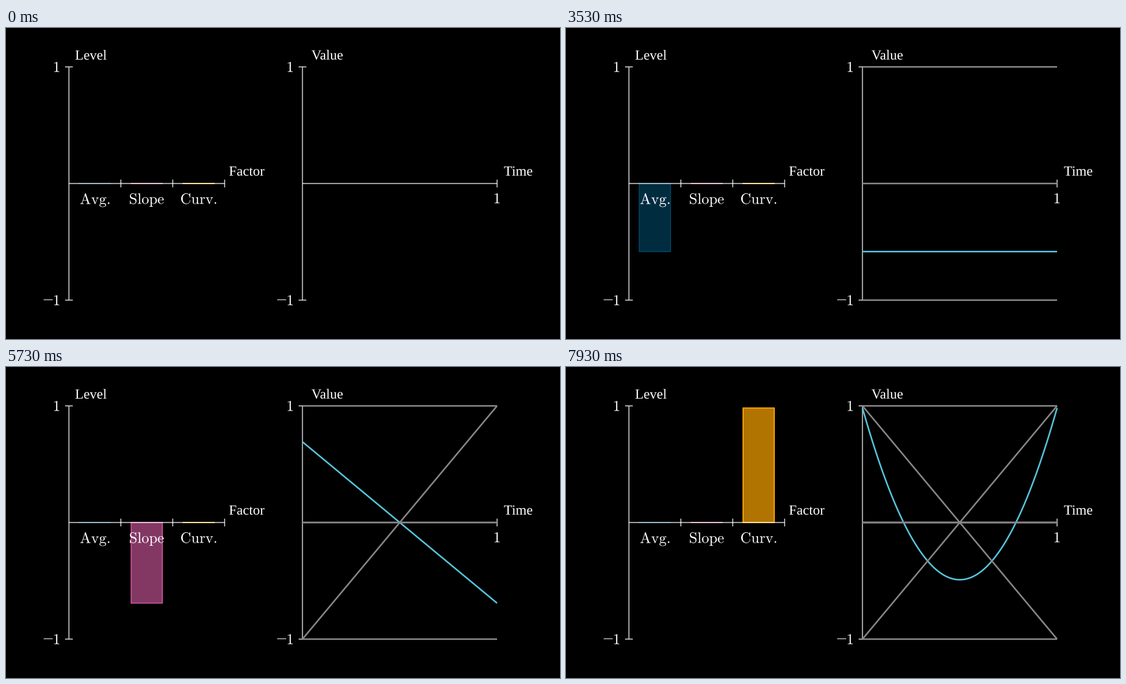
Recreate the animation shown at these times as a matplotlib script. Size 854 px wide and 480 px high, loop 8000 ms.

```python
import numpy as np
import matplotlib.pyplot as plt
from matplotlib.animation import FuncAnimation
from matplotlib.patches import PathPatch, Rectangle
from matplotlib.textpath import TextPath
from matplotlib.transforms import Affine2D

WIDTH, HEIGHT = 854, 480
DPI = 64                         # a power of two keeps the pixel size exact
FRAMES, LOOP_MS = 120, 8000
STEPS = 15                       # frames per move
MID, UNIT = 240, 180             # zero line and height of one level, in px
LEFT, RIGHT, SPAN = 97, 457, 300
BAR_CENTERS = (137, 217, 297)
BAR_COLORS = ("#003f5c", "#bc5090", "#ffa600")
BLUE, GREY = "#58c4dd", "#888888"
TEX_SIZE, TITLE_SIZE = 23.2, 21.5

# Levels of average, slope and curvature at the start of each move.
KEYS = np.array([
    (0, 0, 0), (0, 0, 0), (1, 0, 0), (-1, 0, 0), (0, 0, 0),
    (0, 1, 0), (0, -1, 0), (0, 0, 0), (0, 0, 1),
])

plt.rcParams.update({
    "mathtext.fontset": "cm",
    "path.snap": False,
    "lines.solid_capstyle": "butt",
})
fig = plt.figure(figsize=(WIDTH / DPI, HEIGHT / DPI), dpi=DPI, facecolor="black")
ax = fig.add_axes((0, 0, 1, 1))
ax.set(xlim=(0, WIDTH), ylim=(0, HEIGHT))
ax.axis("off")


def px(width):
    return width * 72 / DPI


def smooth(t):
    """Sigmoid easing scaled to run exactly from 0 to 1."""
    def sigmoid(u):
        return 1 / (1 + np.exp(-u))
    low = sigmoid(-5)
    return (sigmoid(10 * (t - 0.5)) - low) / (1 - 2 * low)


def line(xs, ys, color="white", width=1.2, z=3):
    return ax.plot(xs, ys, color=color, lw=px(width), zorder=z)[0]


def label(text, x, y, size, anchor):
    """Put the point of the ink box given by anchor (0..1) at x, y."""
    path = TextPath((0, 0), text, size=size, prop={"family": "Liberation Serif"})
    box = path.get_extents()
    dx = x - box.x0 - anchor[0] * box.width
    dy = y - box.y0 - anchor[1] * box.height
    path = path.transformed(Affine2D().translate(dx, dy))
    ax.add_patch(PathPatch(path, fc="white", lw=0, zorder=4))
    return box.width


def tex(text, x, y, anchor):
    return label(rf"$\mathrm{{{text}}}$", x, y, TEX_SIZE, anchor)


def draw_axes(x0, x1, ticks):
    line((x0, x1), (MID, MID))
    line((x0, x0), (MID - UNIT, MID + UNIT))
    for x in ticks:
        line((x, x), (MID - 6, MID + 6))
    for sign in (1, -1):
        y = MID + sign * UNIT
        line((x0 - 6, x0 + 6), (y, y))
        width = tex("1", x0 - 15, y, (1, 0.5))
        if sign < 0:
            tex("-", x0 - 15 - width - 2.2, y, (1, 0))


def curve(levels):
    """Sum of the first three Legendre polynomials."""
    average, slope, curvature = levels
    return MID + UNIT * (average + slope * U + curvature * (3 * U**2 - 1) / 2)


draw_axes(LEFT, LEFT + 240, (177, 257, 337))
draw_axes(RIGHT, RIGHT + SPAN, (RIGHT + SPAN,))
for text, x in zip(("Avg.", "Slope", "Curv."), BAR_CENTERS):
    tex(text, x, MID - 15, (0.5, 1))
tex("1", RIGHT + SPAN, MID - 15, (0.5, 1))
for text, x, y in (("Level", 131, 431), ("Value", 495, 431),
                   ("Factor", 371.3, 252), ("Time", 789.5, 252)):
    label(text, x, y, TITLE_SIZE, (0.5, 0))

U = np.linspace(-1, 1, 201)
X = RIGHT + SPAN * (U + 1) / 2

bars = []
for x, color in zip(BAR_CENTERS, BAR_COLORS):
    bar = Rectangle((x - 24, MID), 48, 0.1, fc=(color, 0.7), ec=color,
                    lw=px(1.8), zorder=1)
    bars.append(ax.add_patch(bar))
live = line([], [], BLUE, 2.4, 5)
# Each pose reached leaves a grey trace behind.
traces = [line(X, curve(levels), GREY, 2.4, 6) for levels in KEYS[1:-1]]


def update(frame):
    move, step = divmod(frame, STEPS)
    ease = smooth(step / STEPS)
    levels = KEYS[move] + ease * (KEYS[move + 1] - KEYS[move])
    for bar, level in zip(bars, levels):
        bar.set_height(level * UNIT or 0.1)
    drawn = ease if move == 0 else 1
    if drawn > 0:
        live.set_data(RIGHT + (X - RIGHT) * drawn, curve(levels))
    else:
        live.set_data([], [])
    for i, trace in enumerate(traces):
        trace.set_visible(i < move)
    return [*bars, live, *traces]


anim = FuncAnimation(fig, update, frames=FRAMES, interval=LOOP_MS / FRAMES,
                     repeat=True, repeat_delay=0)
plt.show()
```
